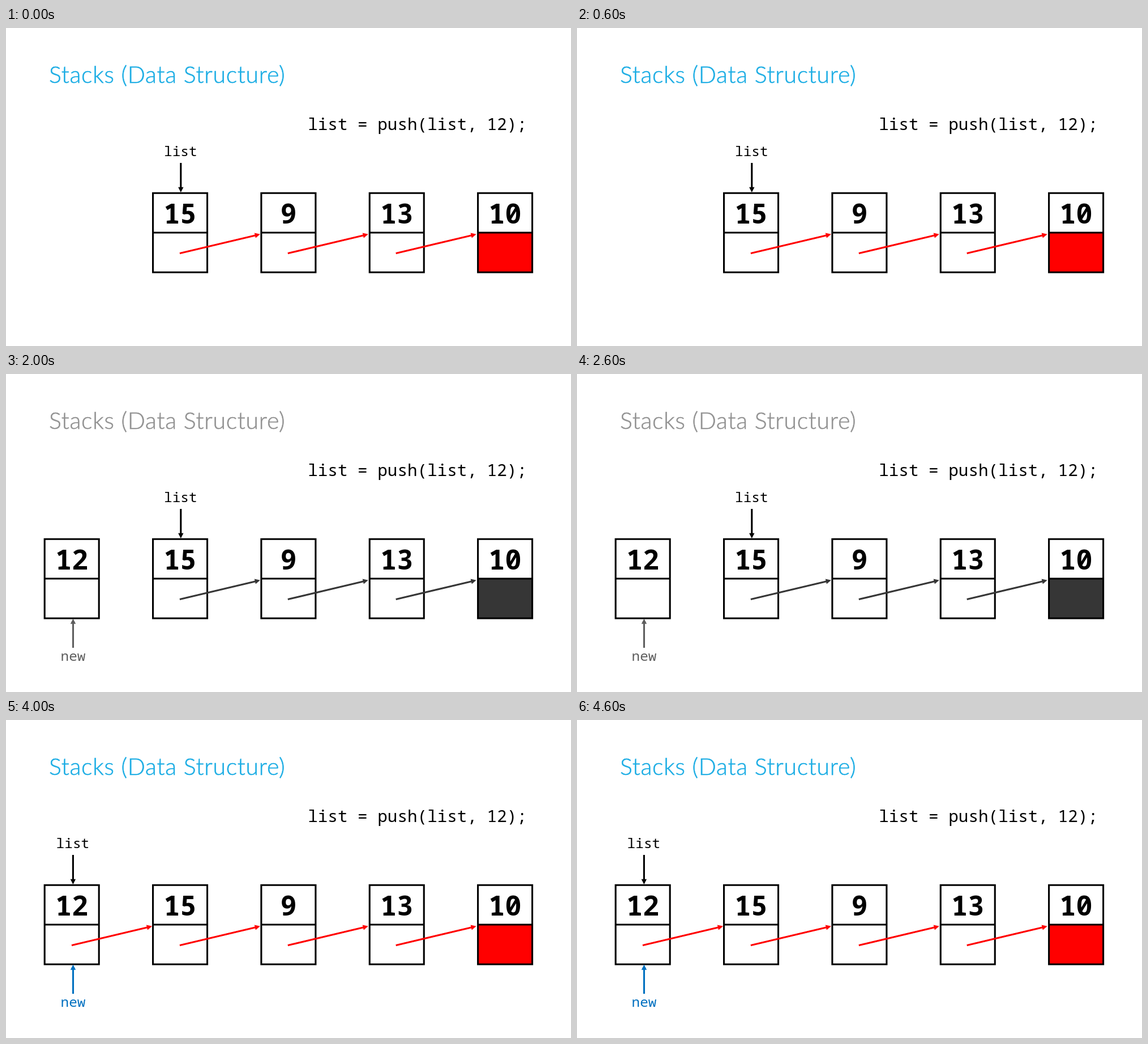
Animation of 998x561 px, one loop 5 s. Source, as an HTML page:

```html
<!DOCTYPE html>
<html lang="en">
<head>
<meta charset="utf-8">
<title>Stack push</title>
<style>
  html, body { margin: 0; width: 100%; height: 100%; overflow: hidden; background: #fff; }
  svg {
    display: block; width: 998px; height: 561px;
    --title: #1cade4; --link: #f00; --fresh: #0070c0;
  }
  svg.grey { --title: #929292; --link: #363636; --fresh: #5e5e5e; }
  text { font-family: "Noto Sans Mono", "DejaVu Sans Mono", monospace; }
  .title {
    font: 300 41px Lato, sans-serif; letter-spacing: 0.74px;
    fill: var(--title); stroke: var(--title); stroke-width: 0.6;
  }
  .code { font-size: 29.3px; }
  .label { font-size: 24.4px; text-anchor: middle; }
  .value { font-size: 48.3px; font-weight: 700; text-anchor: middle; }
  .box { fill: none; stroke: #000; stroke-width: 3.1; }
  .link { color: var(--link); }
  .fresh { color: var(--fresh); }
  .arrow line { stroke: currentColor; stroke-width: 3.1; }
  .arrow path, .label { fill: currentColor; }
</style>
</head>
<body>
<svg id="stage" viewBox="0 0 998 561">
  <text class="title" x="76" y="97">Stacks (Data Structure)</text>
  <text class="code" x="533.2" y="179.7">list = push(list, 12);</text>
</svg>
<script>
  const NS = "http://www.w3.org/2000/svg";
  const stage = document.getElementById("stage");
  const PITCH = 191.35, WIDTH = 96, STEP = 1000;

  // What is visible during each second of the loop.
  const steps = [
    {},
    { node: true },
    { node: true, value: true, grey: true },
    { node: true, value: true, link: true },
    { node: true, value: true, link: true, moved: true }
  ];

  function add(parent, tag, attrs = {}, text = "") {
    const el = document.createElementNS(NS, tag);
    for (const key in attrs) el.setAttribute(key, attrs[key]);
    el.textContent = text;
    parent.appendChild(el);
    return el;
  }

  function arrow(parent, x1, y1, x2, y2, kind = "") {
    const length = Math.hypot(x2 - x1, y2 - y1);
    const angle = Math.atan2(y2 - y1, x2 - x1) * 180 / Math.PI;
    const g = add(parent, "g", {
      class: "arrow " + kind,
      transform: `translate(${x1} ${y1}) rotate(${angle})`
    });
    add(g, "line", { x1: 0, y1: 0, x2: length - 7, y2: 0 });
    add(g, "path", { d: `M${length} 0l-9.3 -4.7v9.4z` });
    return g;
  }

  function node(index, number) {
    const x = 68.2 + index * PITCH;
    const g = add(stage, "g");
    if (index === 4) {
      add(g, "rect", { x, y: 361, width: WIDTH, height: 70, fill: "var(--link)" });
    }
    add(g, "path", { class: "box", d: `M${x} 291.2h${WIDTH}v139.8h-${WIDTH}zM${x} 361h${WIDTH}` });
    const value = add(g, "text", { class: "value", x: x + WIDTH / 2, y: 344.6 }, number);
    return { g, value };
  }

  const nodes = [12, 15, 9, 13, 10].map((number, i) => node(i, number));
  const links = [0, 1, 2, 3].map(i => {
    const x = 116 + i * 190.9;
    return arrow(stage, x, 397.6, x + 142, 363.8, "link");
  });

  const head = add(stage, "g");
  add(head, "text", { class: "label", x: 308.3, y: 226 }, "list");
  arrow(head, 308.8, 238, 308.8, 290);

  const fresh = add(stage, "g", { class: "fresh" });
  add(fresh, "text", { class: "label", x: 118.5, y: 506 }, "new");
  arrow(fresh, 118.5, 483, 118.5, 431.5);

  function show(el, on) {
    el.setAttribute("visibility", on ? "inherit" : "hidden");
  }

  function draw(time) {
    const step = steps[Math.floor(time / STEP) % steps.length];
    show(nodes[0].g, step.node);
    show(nodes[0].value, step.node && step.value);
    show(links[0], step.link);
    show(fresh, step.node);
    head.setAttribute("transform", `translate(${step.moved ? -190.4 : 0} 0)`);
    stage.classList.toggle("grey", !!step.grey);
  }

  const start = performance.now();
  function tick() {
    draw(performance.now() - start);
    requestAnimationFrame(tick);
  }
  tick();
</script>
</body>
</html>
```
